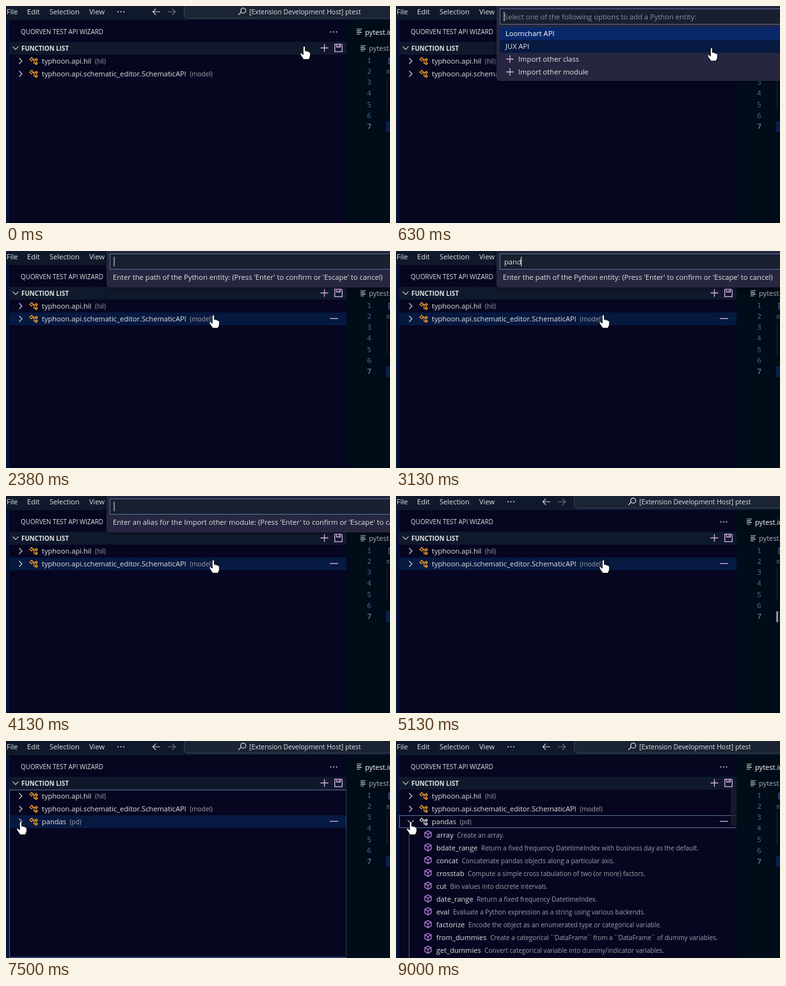
Write an HTML page that moves like this. It is 600 by 339 pixels and loops after 9130 ms.

```html
<!DOCTYPE html>
<html lang="en">
<head>
<meta charset="utf-8">
<title>Function list wizard</title>
<style>
  html, body { margin: 0; width: 100%; height: 100%; overflow: hidden; background: #060621; }
  svg { display: block; width: 600px; height: 339px; }
  text { font: 11.1px "Open Sans", "Noto Sans", sans-serif; fill: #e2e2e2; white-space: pre; }
  .caps { font-size: 9.9px; }
  .bold { font-size: 9.8px; font-weight: 700; }
  .search { font-size: 10.4px; }
  .prompt { font-size: 11.2px; }
  .tab { font-weight: 500; fill: #fff; }
  .note { font-size: 10px; fill: #a0a0aa; }
  .tick { font-family: Roboto, sans-serif; }
  .mono { font: 11.6px "Noto Sans Mono", "DejaVu Sans Mono", monospace; fill: #456c90; }
  .line { fill: none; stroke: #d0d0d0; stroke-width: 1.2; }
  .action { fill: none; stroke: #d3afe6; stroke-width: 1.3; }
  .branch { fill: none; stroke: #ee9d28; stroke-width: 1.3; }
  .cube { fill: none; stroke: #b180d7; stroke-width: 1.3; }
</style>
</head>
<body>
<svg id="stage" viewBox="0 0 600 339" xmlns="http://www.w3.org/2000/svg"></svg>
<script>
const LOOP = 9130, STEP = 125;
const OPEN = 500, PATH = 2000, ALIAS = 4125, CLOSE = 5000, ADDED = 5250,
      PRESS = 7500, FOCUS = 7625, EXPAND = 8375;

const rect = (x, y, w, h, fill, extra = '') =>
  `<rect x="${x}" y="${y}" width="${w}" height="${h}" fill="${fill}" ${extra}/>`;
const text = (x, mid, str, cls = '', extra = '') =>
  `<text x="${x}" y="${mid + 4}" class="${cls}" ${extra}>${str}</text>`;
const path = (d, cls = 'line', x = 0, y = 0, extra = '') =>
  `<path d="${d}" class="${cls}" transform="translate(${x} ${y})" ${extra}/>`;
const group = (id, body) => `<g id="${id}">${body}</g>`;

const RIGHT = 'M-2.5 -4.5L2 0L-2.5 4.5', DOWN = 'M-4.5 -2.2L0 2.3L4.5 -2.2';
const PLUS = 'M-6 0H6M0 -6V6';
const BRANCH = 'M-5.8 -2.6L-2.8 -5.6L-.3 -3.1L-3.3 -.1ZM-.8 -2.2H2.3M.8 -2.2V3.6H2.3' +
  'M2.4 -2L4.4 -4L6.2 -2.2L4.2 -.2ZM2.4 3.7L4.4 1.7L6.2 3.5L4.2 5.5Z';
const CUBE = 'M0 -5.6L5 -3.1V2.9L0 5.7L-5 2.9V-3.1ZM-5 -3.1L0 -.4L5 -3.1M0 -.4V5.7';
const SAVE = 'M-5.8 -5.8H4.6L5.8 -4.6V5.8H-5.8ZM-3 -5.8V-1.5H3V-5.8M1 -5V-2.5';
const LINES = 'M-4 -4H4M-4 -1.3H2.5M-4 1.4H4M-4 4H1.5';
const HAND = 'M-1.8 1.5C-1.8 -.6 1.6 -.6 1.6 1.5V7.3C2.6 6.4 4.2 6.8 4.4 8' +
  'C5.4 7.2 6.8 7.7 7 8.9C8.2 8.4 9.4 9.2 9.4 10.6V14.5C9.4 17 7.8 18 7.5 20.5H-1.4' +
  'C-1.8 18 -5 15.5 -6.2 12.4C-6.7 10.7 -4.8 9.7 -3.6 11.2L-1.8 13Z';

const label = (x, mid, name, note) =>
  text(x, mid, `${name}<tspan dx="5.5" class="note">${
    note.replace(/`+/g, '<tspan class="tick">$&</tspan>')}</tspan>`);
const entity = (mid, name, note, id) =>
  path(RIGHT, 'line', 23, mid, `id="${id}Chevron"`) +
  path(BRANCH, 'branch', 43, mid, `id="${id}Icon"`) + label(56, mid, name, note);

const functions = [
  ['array', 'Create an array.'],
  ['bdate_range', 'Return a fixed frequency DatetimeIndex with business day as the default.'],
  ['concat', 'Concatenate pandas objects along a particular axis.'],
  ['crosstab', 'Compute a simple cross tabulation of two (or more) factors.'],
  ['cut', 'Bin values into discrete intervals.'],
  ['date_range', 'Return a fixed frequency DatetimeIndex.'],
  ['eval', 'Evaluate a Python expression as a string using various backends.'],
  ['factorize', 'Encode the object as an enumerated type or categorical variable.'],
  ['from_dummies', 'Create a categorical ``DataFrame`` from a ``DataFrame`` of dummy variables.'],
  ['get_dummies', 'Convert categorical variable into dummy/indicator variables.']
];

const titleBar = rect(0, 0, 600, 22, '#10192c') +
  [['File', 1], ['Edit', 33], ['Selection', 68], ['View', 130]].map(([s, x]) => text(x, 9, s)).join('') +
  [175, 179.5, 184].map(x => `<circle cx="${x}" cy="9" r="1" fill="#ddd"/>`).join('') +
  path('M6 0H-5.5M-.8 -4.8L-5.6 0L-.8 4.8', 'line', 235, 9) +
  path('M-6 0H5.5M.8 -4.8L5.6 0L.8 4.8', 'line', 259, 9, 'opacity=".5"') +
  rect(278.5, -6.5, 340, 25.5, '#1b2435', 'rx="5" stroke="#3d4557"') +
  path('M-1.5 1.5L-6 6M-1.8 1.2A4 4 0 1 1 1.2 3.2A4 4 0 0 1 -1.8 1.2', 'line', 369, 8) +
  text(380, 9, '[Extension Development Host] ptest', 'search');

const sideBar = rect(0, 22, 5, 317, '#051336') + rect(5, 22, 527, 317, '#060621') +
  text(23, 40, 'QUORVEN TEST API WIZARD', 'caps') +
  [507.5, 512, 516.5].map(x => `<circle cx="${x}" cy="40.5" r="1" fill="#ddd"/>`).join('') +
  rect(5, 56, 527, 20, '#10192c') + path(DOWN, 'line', 15, 65.5) +
  text(24, 65.5, 'FUNCTION LIST', 'bold') +
  path(PLUS, 'action', 497.5, 65.5) + path(SAVE, 'action', 519.5, 65.5);

const list = group('hover', rect(5, -10, 527, 20, '#061940')) +
  rect(5.5, 116.5, 527, 19, 'none', 'id="focusRow" stroke="#596f99"') +
  path('M506 -.5H519', 'action', 0, 0, 'id="minus"') +
  entity(86, 'typhoon.api.hil', '(hil)', 'first') +
  entity(106, 'typhoon.api.schematic_editor.SchematicAPI', '(model)', 'second') +
  group('pandas', entity(126, 'pandas', '(pd)', 'pandas')) +
  group('children', rect(20, 136, 1, 203, '#55555f') + rect(523, 76, 9, 56, '#1f2230', 'opacity=".67"') +
    functions.map(([name, note], i) => path(CUBE, 'cube', 50, 146 + 20 * i) +
      label(63, 146.5 + 20 * i, name, note)).join('')) +
  rect(5.5, 76.5, 526.5, 261.5, 'none', 'id="listBorder" stroke="#596f99"');

const editor = rect(532, 22, 68, 317, '#000c18') +
  path(LINES, 'line', 552, 40) + text(561, 40.5, 'pytest.ini', 'tab') +
  path(LINES, 'line', 558, 66) + text(567, 66, 'pytest.ini', '', 'style="fill:#a9adb5"') +
  [1, 2, 3, 4, 5, 6, 7].map(n => text(564, 67.5 + 17.2 * n, n, 'mono',
    n === 7 ? 'style="fill:#80a2c2"' : '')).join('') +
  rect(594, 180, 6, 17, '#082050') + rect(595, 111, 1, 51, '#16284a') +
  text(595, 84.5, '[', 'mono', 'style="fill:#7b7be0"') +
  text(594.5, 101.7, 'markers', 'mono') +
  rect(594.5, 180, 2, 17, '#ddbb88', 'id="editorCaret"');

const options = ['Loomchart API', 'JUX API', 'Import other class', 'Import other module'];
const picker = rect(157, -8, 460, 10, '#262641', 'id="panel" rx="5" filter="url(#shadow)"') +
  rect(162.5, 4.5, 450, 24, '#181f2f', 'stroke="#596f99"') +
  text(169, 17, '', 'prompt', 'id="input"') + rect(168.5, 9, 1, 15, '#e8e8e8', 'id="inputCaret"') +
  text(167, 41, '', 'prompt', 'id="prompt"') +
  group('options', rect(162, 33, 450, 20, '#08286b', 'rx="3"') +
    rect(162, 53, 450, 20, '#061940', 'id="optionHover" rx="3"') +
    options.map((s, i) => (i > 1 ? path(PLUS, 'action', 178, 83 + 20 * (i - 2)) : '') +
      text(i > 1 ? 191 : 171, 43.3 + 20 * i, s, 'prompt', i ? '' : 'style="fill:#fff"')).join(''));

document.getElementById('stage').innerHTML =
  `<defs><filter id="shadow" x="-10%" y="-20%" width="120%" height="150%">
    <feDropShadow dx="0" dy="0" stdDeviation="3.5" flood-color="#000" flood-opacity=".55"/>
  </filter></defs>` +
  sideBar + list + editor + titleBar + group('picker', picker) +
  `<path id="hand" d="${HAND}" fill="#fff" stroke="#000" stroke-width="1"/>`;

const $ = id => document.getElementById(id);
const show = (id, on) => $(id).setAttribute('visibility', on ? 'inherit' : 'hidden');
const place = (id, x, y) => $(id).setAttribute('transform', `translate(${x} ${y})`);
const typed = (word, start, t) => word.slice(0, Math.max(0, Math.floor((t - start) / STEP) + 1));
const blink = (t, start) => Math.floor((t - start) / 500) % 2 === 0;

// Pointer stops: time, x, y
const stops = [[0, 466, 63], [250, 493, 65.5], [875, 493, 65.5], [1500, 324, 100],
  [6500, 324, 100], [7250, 23, 126], [LOOP, 23, 126]];

function pointer(t) {
  const i = stops.findIndex(s => s[0] > t);
  const [t0, x0, y0] = stops[i - 1], [t1, x1, y1] = stops[i];
  const u = (t - t0) / (t1 - t0), e = u * u * (3 - 2 * u);
  return [x0 + (x1 - x0) * e, y0 + (y1 - y0) * e];
}

function drawPicker(t, y) {
  const open = t >= OPEN && t < CLOSE, choosing = t < PATH;
  show('picker', open);
  if (!open) return;
  show('options', choosing);
  $('panel').setAttribute('height', choosing ? 125 : 65);
  const row = Math.floor((y - 33) / 20);
  $('optionHover').setAttribute('y', 33 + 20 * row);

  const value = t < ALIAS ? typed('pandas', 2750, t) : typed('pd', 4500, t);
  $('input').textContent = choosing ? 'Select one of the following options to add a Python entity:' : value;
  $('input').style.fill = choosing ? '#8b8f9f' : '';
  $('prompt').textContent = choosing ? '' :
    (t < ALIAS ? 'Enter the path of the Python entity:' : 'Enter an alias for the Import other module:') +
    " (Press 'Enter' to confirm or 'Escape' to cancel)";
  const width = choosing || !value ? 0 : $('input').getComputedTextLength();
  $('inputCaret').setAttribute('x', 168.5 + width);
  const since = t < PATH ? OPEN : t < 2750 ? PATH : t < ALIAS ? Math.min(t, 3375) :
    t < 4500 ? ALIAS : Math.min(t, 4625);
  show('inputCaret', blink(t, since));
}

function draw(time) {
  const t = Math.min(72, Math.floor(time / STEP)) * STEP;
  const [x, y] = pointer(t);
  place('hand', x, y);
  drawPicker(t, y);

  const row = Math.floor((y - 76) / 20), mid = 86 + 20 * row;
  const over = row >= 0 && (t < OPEN || t >= PATH);
  show('hover', over && t < FOCUS);
  show('minus', over);
  place('hover', 0, mid);
  place('minus', 0, mid);

  show('pandas', t >= ADDED);
  show('listBorder', t >= PRESS && t < FOCUS);
  show('focusRow', t >= FOCUS);
  show('children', t >= EXPAND);
  $('pandasChevron').setAttribute('d', t >= EXPAND ? DOWN : RIGHT);
  $('pandasIcon').style.stroke = t >= FOCUS ? '#d0d0d0' : '';
  show('editorCaret', t >= 250 && t < OPEN || t >= CLOSE && t < PRESS && blink(t, CLOSE));
}

const start = performance.now();
function tick() {
  draw((performance.now() - start) % LOOP);
  requestAnimationFrame(tick);
}
tick();
</script>
</body>
</html>
```
